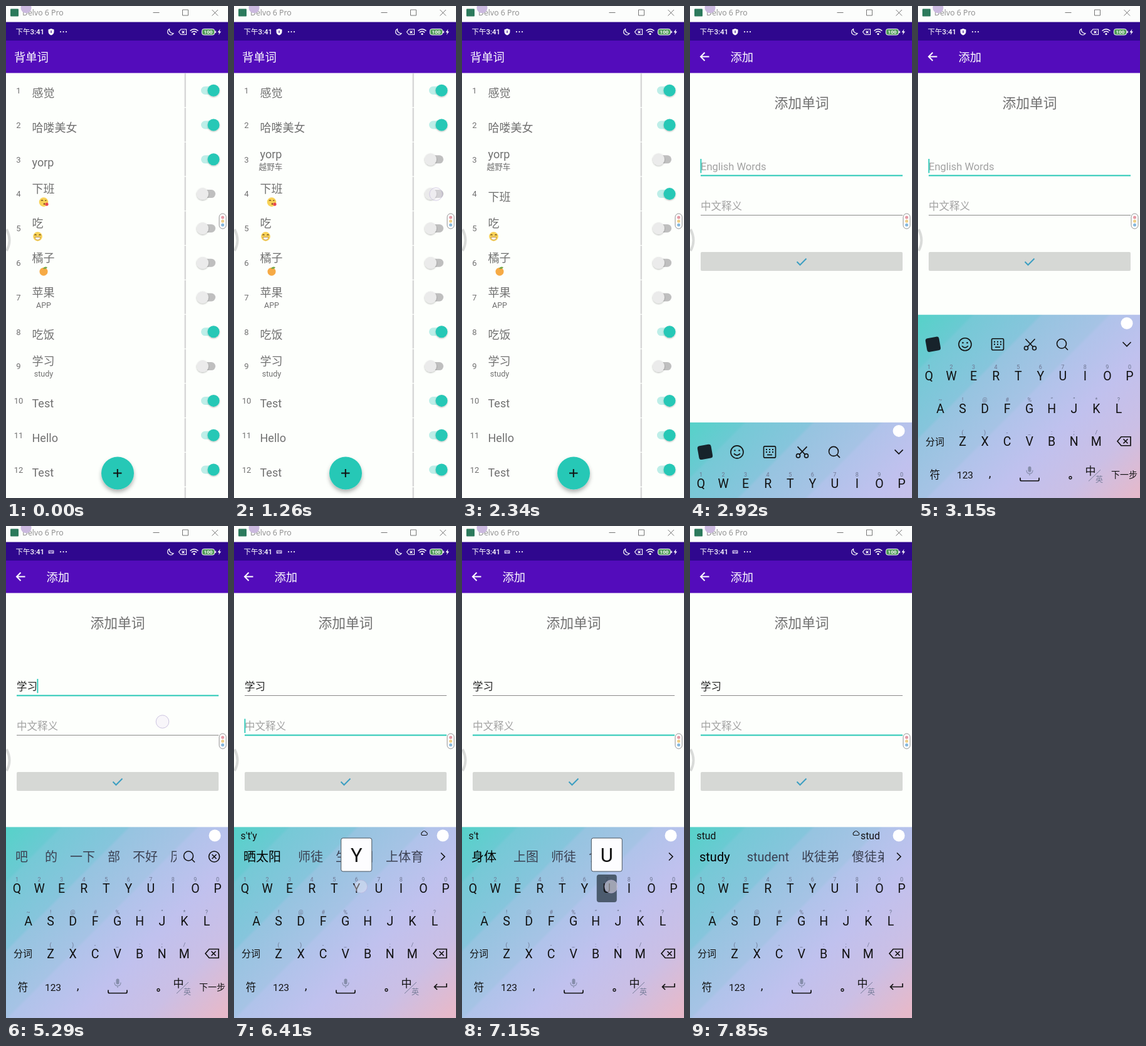
An HTML page for the animation above (7990 ms loop, 354x782 px).

```html
<!DOCTYPE html>
<html lang="zh-CN">
<head>
<meta charset="utf-8">
<style>
html, body { margin: 0; width: 100%; height: 100%; overflow: hidden; background: #fdfffc; }
svg { display: block; font-family: Roboto, "Noto Sans CJK SC", "Noto Sans CJK", sans-serif; }
</style>
</head>
<body>
<svg id="stage" width="354" height="782" viewBox="0 0 354 782">
  <defs>
    <linearGradient id="sky" gradientUnits="userSpaceOnUse" x1="10" y1="470" x2="330" y2="790">
      <stop offset="0" stop-color="#56d2c9"/><stop offset=".13" stop-color="#6acad2"/>
      <stop offset=".14" stop-color="#76c9d6"/><stop offset=".3" stop-color="#86c5dc"/>
      <stop offset=".31" stop-color="#96c4e0"/><stop offset=".47" stop-color="#a6c3e5"/>
      <stop offset=".48" stop-color="#b0c3ea"/><stop offset=".64" stop-color="#c0c1ee"/>
      <stop offset=".82" stop-color="#cbbfe5"/><stop offset="1" stop-color="#e6b9ca"/>
    </linearGradient>
    <filter id="soft" x="-30%" y="-30%" width="160%" height="170%">
      <feDropShadow dx="0" dy="1" stdDeviation="1" flood-opacity=".3"/>
    </filter>
    <filter id="deep" x="-30%" y="-30%" width="160%" height="170%">
      <feDropShadow dx="0" dy="4" stdDeviation="3" flood-opacity=".3"/>
    </filter>
  </defs>
  <g id="list"><g id="rows"></g><g id="fab"></g></g>
  <g id="form"><g id="page"></g><g id="fields"></g></g>
  <g id="keyboard"><g id="keys"></g><g id="strip"></g><g id="presses"></g></g>
  <g id="chrome"></g><g id="notice"></g><g id="touches"></g>
</svg>
<script>
const LOOP = 7990, TEAL = '#27c8b6', PURPLE = '#530cbb', GREY = '#717171';
const $ = id => document.getElementById(id);
const clamp = v => Math.max(0, Math.min(1, v));
const easeOut = v => 1 - (1 - clamp(v)) ** 3;

const text = (x, y, s, size, fill = '#111', attr = '') =>
  `<text x="${x}" y="${y}" font-size="${size}" fill="${fill}" ${attr}>${s}</text>`;
const mid = (x, y, s, size, fill, attr = '') => text(x, y, s, size, fill, 'text-anchor="middle" ' + attr);
const rect = (x, y, w, h, fill, r = 0, attr = '') =>
  `<rect x="${x}" y="${y}" width="${w}" height="${h}" rx="${r}" fill="${fill}" ${attr}/>`;
const circle = (x, y, r, fill, attr = '') => `<circle cx="${x}" cy="${y}" r="${r}" fill="${fill}" ${attr}/>`;
const line = (d, stroke = '#111', w = 1.6, attr = '') =>
  `<path d="${d}" fill="none" stroke="${stroke}" stroke-width="${w}" ${attr}/>`;
const at = (x, y, s) => `<g transform="translate(${x} ${y})">${s}</g>`;

const shown = {};
function put(id, html) {
  if (shown[id] !== html) $(id).innerHTML = shown[id] = html;
}

// ---- word list
const face = circle(0, 0, 7.3, '#f8d257');
const icons = {
  kiss: face + line('M-4 -2q1.5 -2 3 0M2 -2.5h2.5', '#6b4a1c', 1.2) + circle(1, 3, 1.3, '#8a4a20') + circle(5, 3.5, 2.6, '#e8474f'),
  grin: face + line('M-5 -2q1.5 -2 3 0M2 -2q1.5 -2 3 0', '#6b4a1c', 1.2) + '<path d="M-4.5 1h9q-1 4.500-4.500 4.500t-4.500-4.500" fill="#fff" stroke="#a8742a" stroke-width=".7"/>',
  orange: circle(0, 1, 6.5, '#f6aa45') + '<path d="M-1-4q2-4 7-2q-2 4-7 2" fill="#74a848"/>'
};
const words = [
  ['感觉'], ['哈喽美女'], ['yorp', '越野车', 58.5], ['下班', 'kiss', 60], ['吃', 'grin', 50.5], ['橘子', 'orange', 60],
  ['苹果', 'APP', 60], ['吃饭'], ['学习', 'study', 60], ['Test'], ['Hello'], ['Test']
];

function row([word, sub, subX], i, on) {
  const y = 134.2 + 54.8 * i, open = sub && on < .5;
  const note = !open ? '' : icons[sub] ? at(subX, y + 13, icons[sub]) : mid(subX, y + 16.5, sub, 12.6, GREY);
  return mid(20, y + 4.800, i + 1, 13, GREY) + text(41.5, y + (open ? -1.5 : 11), word, 18, GREY) + note +
    rect(284.500, y - 27, 2.5, 53.5, '#d8d8d8') +
    rect(311, y - 6.5, 23, 13, on > .5 ? '#bdeee8' : '#bfbfbf', 6.5) +
    circle(313.5 + 17.5 * on, y, 9.5, on > .5 ? TEAL : '#ebebeb', 'filter="url(#soft)"');
}

const appBar = rect(0, 54, 354, 52.5, PURPLE);
function rows(t) {
  const state = i => i === 2 ? 1 - easeOut((t - 340) / 220) : i === 3 ? easeOut((t - 1270) / 220) : +!words[i][1];
  return rect(0, 54, 354, 728, '#fdfffc') + appBar + text(13, 87.5, '背单词', 18.3, '#fff') +
    words.map((w, i) => row(w, i, state(i))).join('') + rect(284.5, 765, 2.5, 17, '#d8d8d8');
}
$('fab').innerHTML = circle(178, 742.5, 26, TEAL, 'filter="url(#deep)"') + line('M171 742.5h13.500M177.800 736v13', '#111', 2);

// ---- form
$('page').innerHTML = rect(0, 54, 354, 728, '#fdfffc') + appBar +
  line('M30.500 80.500H17.500M23.500 74l-6.500 6.500l6.500 6.500', '#fff', 2) +
  text(64.5, 87.5, '添加', 18.3, '#fff', 'font-weight="500"') + mid(178, 161.500, '添加单词', 21.8, '#707070') +
  rect(17, 391, 322, 30, '#d6d8d5', 2) + line('M170.500 406.500l5 5l10 -10', '#3d9fc2', 2);

const COMMIT = 4850, FOCUS2 = 5340;
function fields(t) {
  const second = t >= FOCUS2, filled = t >= COMMIT;
  const since = second ? FOCUS2 : filled ? COMMIT : 2700;
  const caretOn = Math.floor((t - since) / 500) % 2 === 0;
  const rule = (y, active) => active ? rect(17, y - 1, 322, 2, TEAL) : rect(17, y - .5, 322, 1, '#8b8b8b');
  return text(17, 260.800, filled ? '学习' : 'English Words', 16.500, filled ? '#222' : '#a2a2a2') +
    text(17, 324, '中文释义', 16.5, '#a2a2a2') + rule(269.5, !second) + rule(332.5, second) +
    (caretOn ? rect(filled && !second ? 49.500 : 16.5, second ? 306.500 : 243, 1.8, 22.500, TEAL) : '');
}

// ---- keyboard
const keyRows = [
  ['QWERTYUIOP', '1234567890', 17.5, 576],
  ['ASDFGHJKL', '~!@#%“”*?', 35.5, 628],
  ['ZXCVBNM', '()-_:;/', 71, 680]
];
const keyPos = { '<': [329, 680] };
let keyArt = rect(0, 478.5, 354, 304, 'url(#sky)');
for (const [letters, hints, x0, y] of keyRows) {
  [...letters].forEach((c, i) => {
    const x = x0 + 35.55 * i;
    keyPos[c] = [x, y];
    keyArt += mid(x, y + 6.800, c, 19.5) + mid(x, y - 11.500, hints[i], 9, '#6d7590');
  });
}
$('keys').innerHTML = keyArt + mid(27, 685.3, '分词', 15, '#111', 'font-weight="500"') +
  line('M324 672.500h15v14h-15l-6 -7zM327.500 676l7 7m0 -7l-7 7', '#111', 1.7) +
  mid(27, 738.5, '符', 16.5, '#111', 'font-weight="500"') + mid(75, 738.5, '123', 15.500) +
  mid(114.5, 737, ',', 19) + line('M163 737.500v3q0 2 2 2h26q2 0 2 -2v-3', '#111', 1.7) +
  rect(175.5, 719.500, 5, 9, '#868eab', 2.5) + line('M173 725.500q0 5.500 5 5.500t5 -5.500M178 731v3', '#868eab', 1.2) +
  circle(243, 737.500, 2, 'none', 'stroke="#111" stroke-width="1.300"') +
  mid(275, 733, '中', 17, '#111', 'font-weight="500"') + line('M272 743L291 725', '#777d99', 1) + mid(289, 745, '英', 12, '#777d99');

// [time, key]; '<' deletes
const typed = [[3450, 'X'], [3690, 'U'], [3920, 'E'], [4150, 'X'], [4270, 'I'],
  [5750, 'S'], [6000, 'T'], [6300, 'Y'], [6760, '<'], [7120, 'U'], [7520, 'D']];
const drafts = {
  x: ['x', '想 下 行 小 些 向 先'], xu: ['xu', '需 许 续 虚 徐 须 序'], xue: ['xue', '学 雪 * 血 薛 靴 削'],
  xuex: ["xue'x", '学校 学习 学些 学下'], xuexi: ["xue'xi", '学习 血洗 学系 雪洗'],
  s: ['s', '是 上 说 时 生 三 所'], st: ["s't", '身体 上图 师徒 食堂'], sty: ["s't'y", '晒太阳 师徒 生态园 上体育'],
  stu: ["s'tu", '师徒 上图 梳头 石头'], stud: ['stud', 'study student 收徒弟 傻徒弟']
};

function draftAt(t) {
  const from = t >= FOCUS2 ? FOCUS2 : 0;
  if (!from && t >= COMMIT) return '';
  return typed.filter(([time]) => time > from && t >= time + 75)
    .reduce((s, [, key]) => key === '<' ? s.slice(0, -1) : s + key.toLowerCase(), '');
}

// The first gap is wider than the rest; '*' stands for a cloud picture.
function candidates(list, width, firstFill) {
  let gap = 0, cloud = '';
  const spans = list.split(' ').map((w, i) => {
    if (i) gap += i === 1 ? 27 : 20;
    if (w === '*') {
      gap += 24;
      cloud = '<path d="M106 530a5 5 0 0 1 0-9a8 7 0 0 1 14-2a5.500 5.500 0 0 1 3 11z" fill="#f6f8fc" stroke="#ccd5e3"/>';
      return '';
    }
    const span = `<tspan dx="${gap}" fill="${i ? '#3b4052' : firstFill}">${w}</tspan>`;
    gap = 0;
    return span;
  }).join('');
  return `<svg width="${width}" height="782">${text(15, 532.500, spans, 20)}${cloud}</svg>`;
}

const lens = x => circle(x - 1, 524.500, 7.5, 'none', 'stroke="#111" stroke-width="1.600"') + line(`M${x + 4.5} 530l4.500 4.500`);
const ring = (x, r) => circle(x, 525.5, r, 'none', 'stroke="#111" stroke-width="1.600"');
const toolbar = rect(13, 514.5, 22, 22, '#17232b', 4, 'transform="rotate(-10 24 525.500)"') +
  ring(75, 10) + circle(71.5, 523, 1.2, '#111') + circle(78.5, 523, 1.2, '#111') + line('M70 528q5 5.500 10 0') +
  rect(117.5, 516.500, 19, 18, 'none', 2, 'stroke="#111" stroke-width="1.600"') +
  line('M121 521.500h12M121 525.500h12', '#111', 2, 'stroke-dasharray="2 3"') + line('M123 530h8') +
  line('M171.500 517l12 12.500M186.500 517l-12 12.500') +
  circle(172.500, 531.5, 3, 'none', 'stroke="#111" stroke-width="1.600"') +
  circle(185.5, 531.5, 3, 'none', 'stroke="#111" stroke-width="1.600"') +
  lens(230) + line('M326.500 522l6.500 6.500l6.500 -6.500');
const suggestions = candidates('吧 的 一下 部 不好 历史', 272, '#3b4052') + lens(292) +
  ring(332, 8.500) + line('M328.500 522l7 7m0 -7l-7 7');
const smallCloud = x => line(`M${x - 3} 491.500a2.500 2.500 0 0 1 0 -4.500a3.500 3.500 0 0 1 6.500 0a2.300 2.300 0 0 1 0 4.500z`, '#111', 1.1);

function strip(t) {
  const draft = draftAt(t), mascot = circle(333, 492, 9.5, '#fff');
  if (!draft) {
    return mascot + (t >= COMMIT && t < FOCUS2 ? suggestions : toolbar) +
      mid(329, 737.500, t < FOCUS2 ? '下一步' : '完成', 14, '#111', 'font-weight="500"');
  }
  const [label, list] = drafts[draft];
  return mascot + text(10.5, 498, label, 15.8) + candidates(list, 309, '#000') +
    (draft === 'sty' ? smallCloud(303) : draft === 'stud' ? smallCloud(264.500) + text(272, 498, 'stud', 15.8) : '') +
    line('M330 519.500l6 6l-6 6') + line('M339 727v5.500h-19M324 728l-4.500 4.500l4.500 4.500', '#111', 1.7);
}

function presses(t) {
  return typed.map(([time, key]) => {
    const age = t - time, [x, y] = keyPos[key];
    if (age < 0 || age > 145) return '';
    return (age < 100 ? rect(x - 16, y - 22, 32, 44, '#33424f', 4, 'opacity=".8"') + (key === '<' ? '' : mid(x, y + 6.8, key, 19.5)) : '') +
      (key === '<' ? '' : rect(x - 24.500, y - 80, 49, 53, '#fdfdff', 3, 'stroke="#4a545e"') + mid(x, y - 42.5, key, 31));
  }).join('');
}

// ---- window frame and status bar
$('chrome').innerHTML = rect(0, 0, 354, 26, '#fcfdfc') + rect(0, 25.500, 354, 29.500, '#2f078e') +
  rect(7, 4.5, 13, 12, '#2c7a5c', 1) +
  text(26, 15.3, 'Delvo 6 Pro', 12.3, '#8b8b8b', 'font-family="Open Sans, sans-serif"') + circle(32, 3, 8.500, '#cbb9df') +
  line('M234.500 10.500h10M281.500 6h9v9h-9zM328.500 6l9.500 9.500m0 -9.500l-9.500 9.500', '#777', 1) +
  text(15.5, 45.300, '下午3:41', 11.5, '#fff', 'font-weight="500"') +
  [87, 91.5, 96].map(x => circle(x, 41, 1.1, '#fff')).join('') +
  line('M260.500 36.500a5 5 0 1 0 6.500 7a6 6 0 0 1 -6.500 -7z', '#fff', 1.2) +
  line('M279 37h8.500v8.500h-8.500l-3.500 -4.200zM280.500 39.500l4 4m0 -4l-4 4', '#fff', 1.1) +
  line('M293.500 39.500q6.500 -5.500 13 0M295.800 42q4.200 -3.500 8.400 0', '#fff', 1.5) + circle(300, 44.500, 1.6, '#fff') +
  rect(312.5, 36.500, 20, 9.500, '#4f9a58', 3, 'stroke="#fff"') + rect(333.5, 39.5, 1.5, 3.500, '#fff') +
  mid(322.500, 44.2, '100', 8, '#fff', 'font-weight="700"') +
  '<path d="M341.500 36.500l-4 5.500h2.500l-1 4l4-5.500h-2.500z" fill="#fff"/>' +
  line('M1 355q9 18 0 34', '#d9dbd9', 4) +
  rect(340, 330, 11, 24, '#fff', 5.5, 'stroke="#8f8f8f"') +
  circle(345.500, 336, 2.5, '#e59aa5') + circle(345.5, 342, 2.500, '#efcf86') + circle(345.5, 348, 2.5, '#86b8dd');

const shield = '<path d="M72 36l4.500 1.500v3.500q0 3.500-4.500 5.500q-4.500-2-4.500-5.500v-3.500z" fill="#fff"/>' + rect(71.4, 39, 1.2, 4, '#2f078e');
const tinyKeys = rect(67.500, 38.500, 9, 5.5, '#b9a9df', 1) + line('M69 40.500h6M70 42.500h4', '#2f078e', .8);

// [touch down, touch up, x, y]
const taps = [[230, 350, 322, 245], [1150, 1280, 322, 299], [2370, 2470, 180, 744], [4740, 4860, 40, 526], [5190, 5330, 249.500, 311],
  ...typed.map(([time, key], i) => {
    const [x, y] = keyPos[key];
    return key === 'I' ? [time - 70, time + 100, 264.5, 581] : [time - 40, time + 130, x + 7, key === 'X' && i ? y + 11 : y - 3];
  })];
const touches = t => taps.filter(([down, up]) => t >= down && t < up).map(([, up, x, y]) =>
  circle(x, y, 10.300, '#f3eef8', `fill-opacity=".5" stroke="#b9aed6" stroke-opacity=".7" opacity="${clamp((up - t) / 40 + .3).toFixed(2)}"`)).join('');

function draw() {
  const t = performance.now() % LOOP, enter = easeOut((t - 2490) / 380);
  $('list').setAttribute('transform', `translate(${-88 * enter} 0)`);
  $('form').setAttribute('transform', `translate(${354 * (1 - enter)} 0)`);
  $('keyboard').setAttribute('transform', `translate(0 ${304 * (1 - easeOut((t - 2850) / 458))})`);
  put('rows', rows(t));
  put('fields', fields(t));
  put('strip', strip(t));
  put('presses', presses(t));
  put('notice', t < 3250 ? shield : tinyKeys);
  put('touches', touches(t));
  requestAnimationFrame(draw);
}
draw();
</script>
</body>
</html>
```
